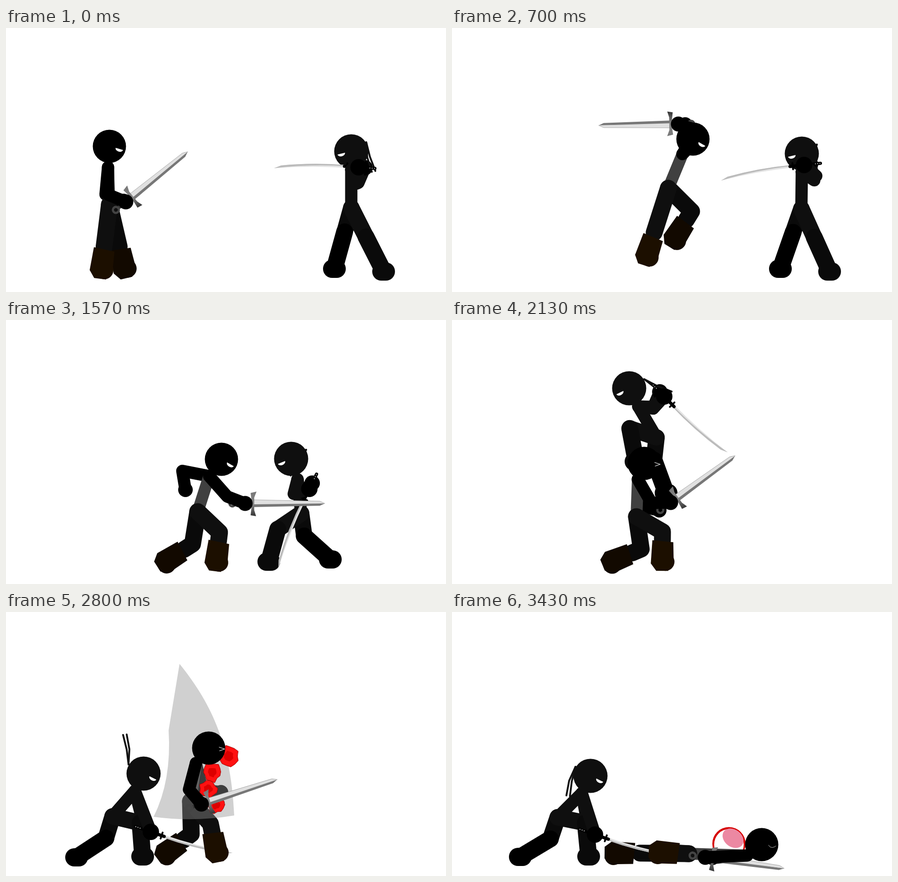
Animation of 966x580 px, one loop 3.46 s. Source, as an HTML page with a canvas:

```html
<!DOCTYPE html>
<html>
<head>
<meta charset="utf-8">
<style>
  html, body { margin: 0; width: 100%; height: 100%; overflow: hidden; background: #fff; }
  canvas { display: block; }
</style>
</head>
<body>
<canvas id="stage" width="966" height="580"></canvas>
<script>
const c = document.getElementById('stage').getContext('2d');
const LOOP = 3460, INK = '#0f0f0f', SHADE = '#0a0a0a';

// Key poses hold only what changes; knees, elbows, blades and headband follow by rule.
const knight = {
  thigh: [66, 72], shin: [66, 72], arm: [60, 42],
  keys: [
    { at: 0, head: [227, 260], neck: [-3, 46], hip: [227, 388], foot1: [209, 531], foot2: [260, 530],
      hand1: [263, 382], hand2: [258, 380], aim: -39, bend: 1 },
    { at: 8, head: [249, 270], hand1: [180, 248], aim: -176 },
    { at: 16, head: [399, 276], hip: [352, 388], foot1: [412, 520], foot2: [285, 515] },
    { at: 21, head: [529, 244], neck: [-23, 33], hip: [475, 352], foot1: [427, 502], foot2: [488, 464],
      hand1: [497, 211], hand2: [512, 212], aim: -181 },
    { at: 27, head: [510, 268], hip: [468, 388], foot1: [488, 529], hand1: [535, 300], aim: -58 },
    { at: 34, head: [403, 287], neck: [2, 44], hip: [430, 409], foot1: [461, 530], foot2: [497, 530],
      hand1: [396, 407], hand2: [455, 316], aim: 14 },
    { at: 40, foot2: [349, 531] },
    { at: 47, head: [473, 306], neck: [-27, 37], hip: [421, 421], foot1: [461, 532],
      hand1: [525, 403], hand2: [394, 373], aim: 0 },
    { at: 64, head: [422, 315], neck: [-14, 35], hip: [405, 432], hand1: [480, 401], hand2: [455, 418], aim: -36 },
    { at: 84, head: [445, 299], neck: [-28, 33], hip: [405, 416], foot1: [462, 530], foot2: [349, 531],
      hand1: [429, 422], hand2: [472, 396], aim: -18 },
    { at: 97, head: [530, 366], hip: [455, 480], hand1: [510, 490], aim: 8, bend: 1 },
    { at: 103, head: [680, 511], neck: [-32, 24], hip: [520, 531], foot1: [452, 527], foot2: [355, 529],
      hand1: [556, 539], hand2: [572, 540], aim: 8, bend: 0 }
  ]
};
const guard = { at: 0, head: [758, 271], neck: [0, 40], hip: [758, 395], foot1: [829, 535], foot2: [721, 529],
  hand1: [774, 306], aim: 184, bend: 1 };
const ninja = {
  thigh: [62, 50], shin: [74, 77], arm: [33, 36],
  keys: [
    guard,
    { ...guard, at: 16 },
    { ...guard, at: 21, head: [768, 276], hip: [767, 397], hand1: [773, 301], aim: 174 },
    { at: 25, hand1: [778, 310], aim: 308 },
    { at: 30, head: [612, 308], hand1: [620, 350], aim: 240 },
    { at: 34, head: [581, 314], neck: [20, 36], hip: [642, 427], foot1: [577, 526], foot2: [714, 528],
      hand1: [648, 360], aim: 279.5 },
    { at: 38, aim: 315 },
    { at: 47, head: [626, 305], neck: [14, 45], hip: [648, 425], foot1: [577, 531], foot2: [712, 526],
      hand1: [666, 371], aim: 116 },
    { at: 57, head: [525, 197], hip: [575, 305], foot1: [515, 400], foot2: [645, 405], aim: 32 },
    { at: 64, head: [389, 150], neck: [20, 40], hip: [449, 258], foot1: [404, 311], foot2: [470, 380],
      hand1: [466, 168], aim: 46 },
    { at: 70, head: [338, 106], hip: [358, 225], foot1: [345, 325], hand1: [392, 180], aim: -81 },
    { at: 78, head: [292, 200], hip: [248, 312], hand1: [250, 225], aim: -155 },
    { at: 84, head: [302, 355], neck: [-19, 38], hip: [234, 449], foot1: [300, 537], foot2: [155, 539],
      hand1: [318, 483], aim: 19 },
    { at: 97, head: [304, 360], hip: [232, 451], foot2: [150, 538], hand1: [314, 489], aim: 19 }
  ]
};

const mix = (a, b, k) => Array.isArray(a) ? a.map((v, i) => mix(v, b[i], k)) : a + (b - a) * k;
const clamp = v => Math.max(0, Math.min(1, v));
const noise = n => { const v = Math.sin(n * 127.1) * 43758.5453; return v - Math.floor(v); };
const heading = (a, b) => Math.atan2(b[1] - a[1], b[0] - a[0]);

function sample(keys, name, step) {
  const own = keys.filter(k => name in k), i = own.findIndex(k => k.at > step);
  if (i < 0) return own[own.length - 1][name];
  const a = own[i - 1] || own[i], b = own[i];
  return mix(a[name], b[name], clamp((step - a.at) / (b.at - a.at || 1)));
}

// Middle joint of a two-bone limb; an overstretched limb is straight.
function joint(from, to, l1, l2, bend) {
  const dx = to[0] - from[0], dy = to[1] - from[1], d = Math.hypot(dx, dy) || 1;
  let along = d * l1 / (l1 + l2), out = 0;
  if (d < l1 + l2 && bend) {
    along = Math.max(-l1, Math.min(l1, (l1 * l1 - l2 * l2 + d * d) / (2 * d)));
    out = Math.sqrt(l1 * l1 - along * along) * bend;
  }
  return [from[0] + (dx * along + dy * out) / d, from[1] + (dy * along - dx * out) / d];
}

function pose(rig, step, side) {
  const p = { side };
  for (const name of Object.keys(rig.keys[0])) p[name] = sample(rig.keys, name, step);
  p.lean = Math.atan2(-p.neck[0] * side, p.neck[1]);
  p.neck = p.neck.map((v, i) => v + p.head[i]);
  p.aim *= Math.PI / 180;
  p.hand2 = p.hand2 || [p.hand1[0] - 14 * Math.cos(p.aim), p.hand1[1] - 14 * Math.sin(p.aim)];
  for (const n of [1, 2]) {
    p['knee' + n] = joint(p.hip, p['foot' + n], rig.thigh[n - 1], rig.shin[n - 1], side * p.bend);
    p['elbow' + n] = joint(p.neck, p['hand' + n], ...rig.arm, -p.bend);
  }
  const before = sample(rig.keys, 'head', step - 2);
  p.speed = p.head.map((v, i) => (v - before[i]) / 2);
  return p;
}

function line(color, width, ...pts) {
  c.strokeStyle = color;
  c.lineWidth = width;
  c.beginPath();
  pts.forEach(p => c.lineTo(...p));
  c.stroke();
}
function shape(fill, ...xy) {
  c.fillStyle = fill;
  c.beginPath();
  for (let i = 0; i < xy.length; i += 2) c.lineTo(xy[i], xy[i + 1]);
  c.closePath();
  c.fill();
}
function oval(fill, x, y, rx, ry = rx, turn = 0, end = 2 * Math.PI) {
  c.fillStyle = fill;
  c.beginPath();
  c.ellipse(x, y, rx, ry, turn, 0, end);
  c.fill();
}
function at([x, y], angle, draw) {
  c.save();
  c.translate(x, y);
  c.rotate(angle);
  draw();
  c.restore();
}

function eye(p, mood) {
  c.save();
  c.translate(...p.head);
  c.scale(p.side, 1);
  if (mood === 'squint') line('#fff', 1.2, [23, -2], [35, 2], [24, 6]);
  else if (mood === 'closed') line('#bbb', 1, [15, 1], [18, 5], [23, 6.5], [28, 5], [31, 3]);
  else {
    c.rotate(p.lean * .45);
    oval('#fff', 22, 5, 8.5, 6, .25, Math.PI);
  }
  c.restore();
}

function bootedLeg(p, n, leg, boot) {
  const knee = p['knee' + n], foot = p['foot' + n];
  line(leg, 37, p.hip, knee, mix(knee, foot, .3));
  at(foot, heading(knee, foot) - Math.PI / 2, () => {
    shape(boot, -22, -47, 24, -43, 25, -8, 13, 20, -13, 20, -25, 4);
    oval(boot, 7, 0, 20);
  });
}
function bareLeg(p, n, thigh, shin) {
  const knee = p['knee' + n], [x, y] = p['foot' + n];
  line(thigh, 36, p.hip, knee);
  line(shin, 37, knee, [x, y]);
  line(shin, 40, [x - 5, y], [x + 5, y]);
}
function arm(p, n, color, r) {
  line(color, 27, p.neck, p['elbow' + n], p['hand' + n]);
  oval('#000', ...p['hand' + n], r);
}

function broadsword(p) {
  at(p.hand1, p.aim, () => {
    line('#333', 8, [15, 0], [-18, 0]);
    c.strokeStyle = '#444';
    c.lineWidth = 5;
    c.beginPath();
    c.arc(-28, 0, 6.5, 0, 7);
    c.stroke();
    shape('#777', 18, 0, 18, 8, 164, 5, 175, 0);
    shape('#e0e0e0', 18, -8, 164, -5, 175, 0, 18, 2);
    line('#999', .8, [18, -8], [164, -5], [175, 0]);
    const metal = c.createLinearGradient(0, -26, 0, 28);
    metal.addColorStop(0, '#777');
    metal.addColorStop(.5, '#888');
    metal.addColorStop(1, '#333');
    shape(metal, 25, -26, 20, -13, 20, 15, 24, 28, 12, 26, 15, 1, 12, -23);
  });
}
function katana(p) {
  const blade = (fill, top, bottom) => {
    c.fillStyle = fill;
    c.beginPath();
    c.moveTo(25, top);
    c.quadraticCurveTo(105, top, 185, -15);
    c.lineTo(170, bottom - 11);
    c.quadraticCurveTo(100, bottom + 1, 25, bottom);
    c.fill();
  };
  at(p.hand1, p.aim, () => {
    blade('#e4e4e4', -3, 3);
    blade('#bbb', .5, 3);
    line('#000', 4, [25, -7], [25, 7]);
    line('#000', 7, [31, 0], [-36, 0]);
    for (const x of [-25, -30, -35]) oval('#aaa', x, 0, 1.2);
  });
}

// Two ribbons that hang down and trail behind the moving head.
function headband(p) {
  const knot = [p.head[0] - p.side * 33, p.head[1] - 20];
  const angle = Math.atan2(4 - p.speed[1], -p.speed[0] - p.side);
  at(knot, angle, () => {
    for (const s of [-1, 1]) line('#111', 4, [0, 0], [33, s * 3 + 3], [66, s * 4]);
  });
}

function drawNinja(p) {
  bareLeg(p, 2, SHADE, '#000');
  line(INK, 27, p.neck, p.hip);
  arm(p, 2, INK, 17);
  bareLeg(p, 1, INK, SHADE);
  headband(p);
  oval(INK, ...p.head, 37.5);
  eye(p, 'open');
  katana(p);
  arm(p, 1, INK, 18);
}

function wound(head, k) {
  const [x, y] = mix(head, [608, 509], k);
  oval('#d60000', x, y, 36.5);
  oval('#fff', x, y + 2, 32.5, 34);
  oval('#ec88a2', x + 9, y - 12, 25, 19, .65);
}
function swoosh(step) {
  c.globalAlpha = .425 * clamp((91 - step) / 6);
  c.fillStyle = '#919191';
  c.beginPath();
  c.moveTo(381, 114);
  c.bezierCurveTo(455, 205, 495, 300, 501, 447);
  c.quadraticCurveTo(412, 462, 324, 450);
  c.quadraticCurveTo(364, 370, 357, 260);
  c.fill();
  c.globalAlpha = 1;
}
function blood(step) {
  const age = step - 84, size = step < 84 ? .6 : clamp((96 - step) / 9);
  for (let n = 0; n < 4; n++) {
    const x = 488 - 48 * n + 13 * n * n + age * (4 - n / 2);
    const y = 316 + 36 * n + age * 2 + age * Math.abs(age) * .4;
    for (const [fill, scale] of [['#f11', 1], ['#d00', .5]]) {
      const pts = [];
      for (let i = 0; i < 14; i++) {
        const a = i * Math.PI / 7, d = (22 - n * 1.5) * size * scale * (.78 + .4 * noise(n * 20 + i + 1));
        pts.push(x + Math.cos(a) * d, y + Math.sin(a) * d);
      }
      shape(fill, ...pts);
      if (scale === 1) { c.strokeStyle = '#900'; c.lineWidth = 1; c.stroke(); }
    }
  }
}
function sparks(step) {
  const grow = .5 + (step - 30) / 8;
  c.strokeStyle = '#000';
  c.lineWidth = 1;
  for (let i = 0; i < 14; i++) {
    const forward = i < 9, angle = forward ? -.9 + i * .23 : 2 + (i - 9) * .55;
    const from = forward ? 6 + noise(i + 3) * 10 : (12 + noise(i + 31) * 14) * grow;
    const len = forward ? (20 + noise(i + 9) * 28) * grow : 8;
    at([543, 300], angle, () => {
      shape('#ff3', from, 0, from + len * .4, -3, from + len, 0, from + len * .4, 3);
      c.stroke();
    });
  }
  oval('#ffc', 542, 300, 7);
}

function draw(step) {
  c.fillStyle = '#fff';
  c.fillRect(0, 0, 966, 580);
  c.lineCap = c.lineJoin = 'round';
  const k = pose(knight, step, 1);
  const hurt = step >= 31 && step < 41 || step >= 58 && step < 97;

  bootedLeg(k, 2, SHADE, '#120900');
  arm(k, 2, '#000', 16);
  drawNinja(pose(ninja, step, step < 73 ? -1 : 1));
  if (step > 97) wound(k.head, (step - 97) / 6);
  line('#404040', 26, k.neck, k.hip);
  bootedLeg(k, 1, INK, '#1c0f00');
  if (step >= 82 && step < 91) swoosh(step);
  if (step >= 82 && step < 96) blood(step);
  broadsword(k);
  oval('#000', ...k.head, 36.5);
  eye(k, hurt ? 'squint' : step >= 97 ? 'closed' : 'open');
  arm(k, 1, '#000', 16.5);
  if (step >= 30 && step < 37) sparks(step);
}

const start = performance.now();
function tick() {
  const t = (performance.now() - start) % LOOP;
  draw(Math.floor((t + 4) * .03)); // 30 drawings a second
  requestAnimationFrame(tick);
}
tick();
</script>
</body>
</html>
```
